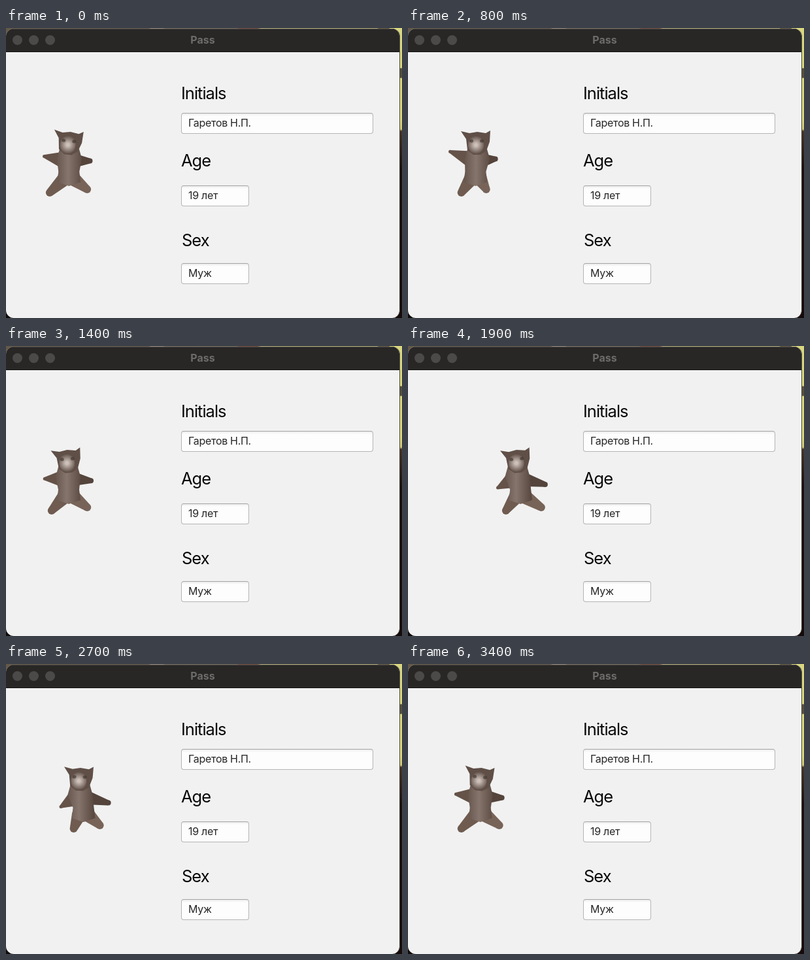
These frames come from a looping animation (606 px wide and 444 px high, 3.5 s). An HTML page with a canvas:

```html
<!DOCTYPE html>
<html lang="en">
<head>
<meta charset="utf-8">
<title>Pass</title>
<style>
html, body { margin: 0; width: 606px; height: 444px; overflow: hidden; }
body { position: relative; font-family: Inter, sans-serif;
  background: linear-gradient(#d9d780 61px, #55513c 62px 76px, #d9d780 77px 140px, #cfc678 155px, #453527 158px, #1a0f0e 215px, #160b0b); }
.left { position: absolute; left: 0; top: 0; width: 30px; height: 444px; background: linear-gradient(#645949 14px, #100b0b 30px); }
.strip { position: absolute; width: 600px; height: 3px;
  background: linear-gradient(90deg, #645949 218px, #9b8982 222px 240px, #746b5c 244px 353px, #75483c 357px 385px, #b0aa76 390px 568px, #645540 570px 586px, #d9d780 588px); }
.win { position: absolute; top: 1px; width: 602px; height: 443px; border-radius: 12px; background: #f1f1f1; overflow: hidden; border-right: 1px solid #4b4a43; }
.bar { height: 36px; background: #282726; box-shadow: inset 0 1px #4d4c4a, inset 0 -1px #121212; font: bold 16px/34px Inter, sans-serif; color: #6d6c6b; text-align: center; }
.bar i { position: absolute; top: 10px; width: 15px; height: 15px; border-radius: 50%; background: #4b4a49; }
h2 { position: absolute; left: 268px; margin: 0; font: 25.5px/30px Inter, sans-serif; letter-spacing: -1px; color: #080808; }
p { position: absolute; left: 268px; margin: 0; box-sizing: border-box; width: 103.5px; height: 32px; padding-left: 10px;
  border: 1px solid #b5b5b5; border-top-color: #a5a5a5; border-radius: 4px; background: linear-gradient(#ececec, #fdfdfd 4px);
  font: 16px/29px Inter, sans-serif; letter-spacing: -.3px; color: #262626; }
canvas { position: absolute; left: 0; top: 0; }
</style>
</head>
<body>
<div class="left"></div>
<div class="strip"></div>
<div class="win"><div class="bar"><i style="left:10px"></i><i style="left:35px"></i><i style="left:60px"></i>Pass</div></div>
<h2 style="top:85px">Initials</h2><p style="top:130px;width:294px">Гаретов Н.П.</p>
<h2 style="top:188px">Age</h2><p style="top:241px">19 лет</p>
<h2 style="top:310px;left:269px">Sex</h2><p style="top:360px">Муж</p>
<canvas width="260" height="300"></canvas>
<script>
const g = document.querySelector('canvas').getContext('2d');
const LOOP = 3500, STEP = 100, HEAD_Y = 176;

// where the cat hops to: time, head x
const hops = [[0, 97], [400, 122], [800, 106], [1400, 95], [1950, 169], [2400, 119], [3000, 108], [LOOP, 111]];

function hopX(t) {
  const i = hops.findIndex(h => t < h[0]);
  const [t0, a] = hops[i - 1], [t1, b] = hops[i];
  return a + (b - a) * (1 - Math.cos(Math.PI * (t - t0) / (t1 - t0))) / 2;
}

function poly(color, ...pts) {
  g.fillStyle = color;
  g.beginPath();
  pts.forEach(p => g.lineTo(...p));
  g.fill();
}

function oval(color, x, y, rx, ry) {
  g.fillStyle = color;
  g.beginPath();
  g.ellipse(x, y, rx, ry, 0, 0, 7);
  g.fill();
}

// a tapered limb from (x, y), radius r, to (u, v), radius s
function limb(color, x, y, u, v, r, s) {
  const d = Math.hypot(u - x, v - y), nx = (y - v) / d, ny = (u - x) / d;
  poly(color, [x + nx * r, y + ny * r], [u + nx * s, v + ny * s],
    [u - nx * s, v - ny * s], [x - nx * r, y - ny * r]);
  oval(color, u, v, s, s);
}

// drawn around the middle of the head
function cat(t) {
  const w = 2 * Math.PI * t / LOOP;
  const sway = Math.cos(w - 1.05);
  const lean = 3 - 9 * sway;
  const spread = 24 + 5 * Math.cos(2 * w - 5.9);
  const hip = lean / 2, hipY = 55;

  limb('#6f5b50', hip - 7, hipY, lean - spread, 76, 11, 6);
  limb('#786358', hip + 7, hipY, lean + spread, 71, 11, 6);
  limb('#655248', -4, 27, -35 - 7 * sway, 29 - 17 * sway, 15, 2.5);
  limb('#54443c', 4, 27, 36 - 9 * sway, 31 - 7 * sway, 12, 4);

  const fur = g.createLinearGradient(-20, 0, 20, 0);
  fur.addColorStop(0, '#66554c');
  fur.addColorStop(.45, '#86756c');
  fur.addColorStop(1, '#5b4a42');
  poly(fur, [-14, 6], [14, 6], [19, 24], [hip + 16, 44], [hip + 18, 60],
    [hip, 66], [hip - 18, 60], [hip - 16, 44], [-19, 24]);

  g.rotate(-.1 * Math.cos(w - 3));
  poly('#5f4f47', [-25, -18], [-12, -15], [0, -17], [13, -15], [20, -19],
    [19, -2], [14, 12], [5, 18], [-6, 18], [-15, 11], [-17, -6]);
  const face = g.createRadialGradient(-2, 3, 2, -2, 3, 14);
  face.addColorStop(0, '#cdc1ba');
  face.addColorStop(1, '#cdc1ba00');
  oval(face, -2, 3, 12, 14);
  oval('#3b302c99', -9, -3, 3, 2.5);
  oval('#3b302c99', 7, -3, 3, 2.5);
}

function frame(now) {
  const t = Math.floor(now % LOOP / STEP) * STEP;
  g.clearRect(0, 0, 260, 300);
  g.save();
  g.translate(hopX(t), HEAD_Y);
  cat(t);
  g.restore();
  requestAnimationFrame(frame);
}
frame(0);
</script>
</body>
</html>
```
